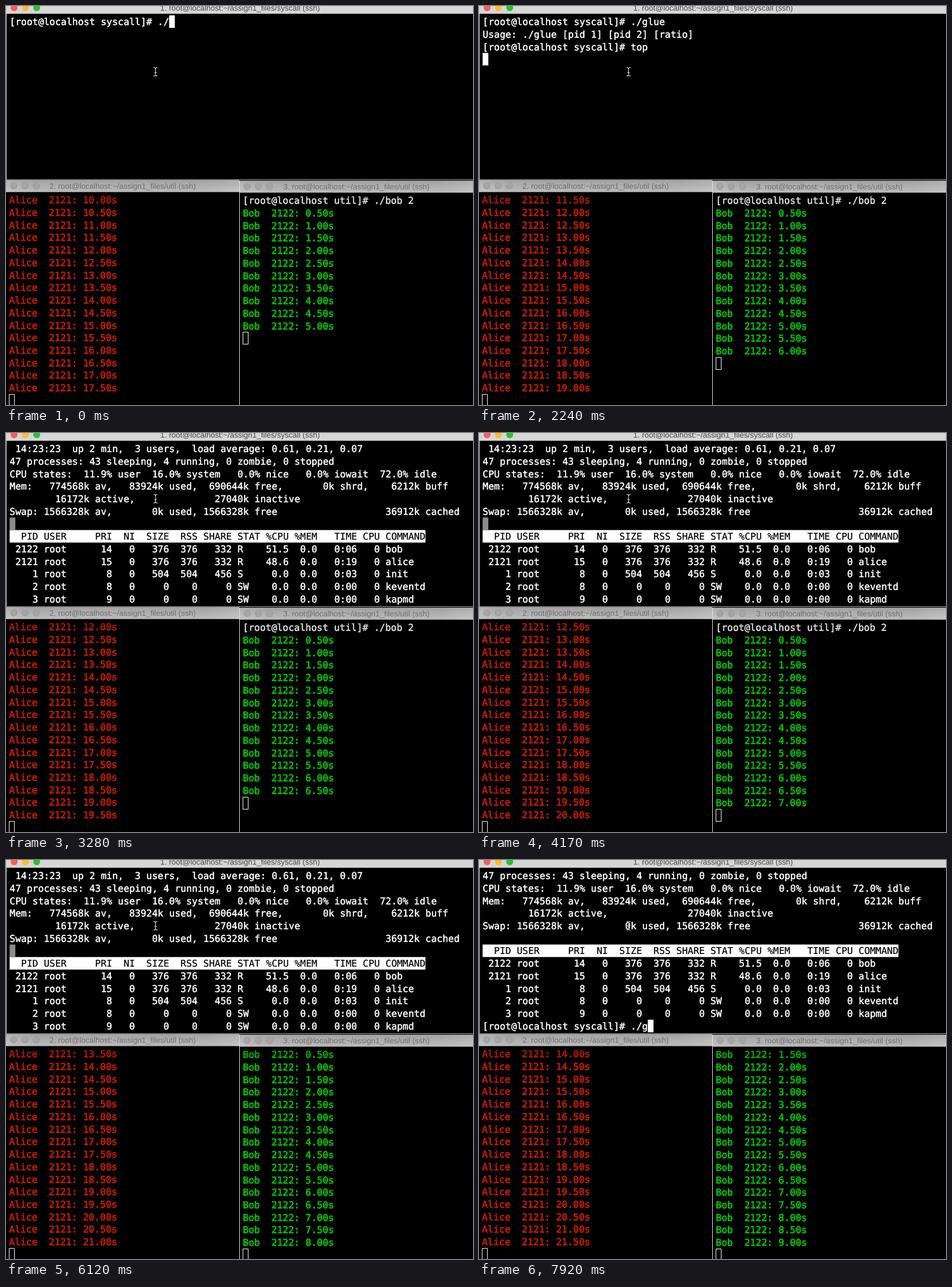
An HTML page with a canvas that plays this animation: 809 by 692 pixels, repeating every 8 s.

```html
<!DOCTYPE html>
<html lang="en">
<head>
<meta charset="utf-8">
<title>Three terminals</title>
<style>
html, body { margin: 0; width: 100%; height: 100%; overflow: hidden; background: #000; }
canvas { display: block; }
</style>
</head>
<body>
<canvas id="stage" width="809" height="692"></canvas>
<script>
const ctx = document.getElementById('stage').getContext('2d', { alpha: false });
const LOOP = 8000, CELL = 9.867, LINE = 21.73;
const RED = '#c91b00', GREEN = '#00c200', WHITE = '#fff';
const REGULAR = 0.5, BOLD = 0.8;
const PROMPT = '[root@localhost syscall]# ';

// Each pane: left edge and top of its first text row
const TOP = { x: 6.3, y: 16.2 }, LEFT = { x: 5.2, y: 325.3 }, RIGHT = { x: 410.3, y: 326.3 };

const aliceTicks = [140, 1190, 2240, 3130, 4170, 5220, 6120, 7170];
const bobTicks = [890, 1940, 2990, 3870, 4920, 5820, 6870, 7920];

const proc = (pid, pri, size, share, stat, cpu, time, cmd) =>
  String(pid).padStart(5) + ' root' + String(pri).padStart(8) + '   0' +
  String(size).padStart(6) + String(size).padStart(5) + String(share).padStart(6) +
  ' ' + stat.padEnd(4) + cpu.padStart(5) + '  0.0' + time.padStart(7) + '   0 ' + cmd;

const HEADER = '  PID USER     PRI  NI  SIZE  RSS SHARE STAT %CPU %MEM   TIME CPU COMMAND';
const report = [
  ' 14:23:23  up 2 min,  3 users,  load average: 0.61, 0.21, 0.07',
  '47 processes: 43 sleeping, 4 running, 0 zombie, 0 stopped',
  'CPU states:  11.9% user  16.0% system   0.0% nice   0.0% iowait  72.0% idle',
  'Mem:   774568k av,   83924k used,  690644k free,       0k shrd,    6212k buff',
  '        16172k active,              27040k inactive',
  'Swap: 1566328k av,       0k used, 1566328k free                   36912k cached',
  '',
  HEADER,
  proc(2122, 14, 376, 332, 'R', '51.5', '0:06', 'bob'),
  proc(2121, 15, 376, 332, 'R', '48.6', '0:19', 'alice'),
  proc(1, 8, 504, 456, 'S', '0.0', '0:03', 'init'),
  proc(2, 8, 0, 0, 'SW', '0.0', '0:00', 'keventd'),
  proc(3, 9, 0, 0, 'SW', '0.0', '0:00', 'kapmd')
];

const passed = (ticks, t) => ticks.filter(at => t >= at).length;

function rect(color, x, y, w, h) {
  ctx.fillStyle = color;
  ctx.fillRect(x, y, w, h);
}

function dot(color, x, y, r) {
  ctx.fillStyle = color;
  ctx.beginPath();
  ctx.arc(x, y, r, 0, 7);
  ctx.fill();
}

// Text on the character grid; weight thickens the strokes
function print(pane, row, text, color, weight = REGULAR) {
  ctx.font = '16.4px "DejaVu Sans Mono", monospace';
  ctx.textAlign = 'left';
  ctx.fillStyle = ctx.strokeStyle = color;
  ctx.lineWidth = weight;
  const y = pane.y + row * LINE + 16.9;
  [...text].forEach((ch, i) => {
    if (ch === ' ') return;
    const x = pane.x + i * CELL;
    ctx.fillText(ch, x, y);
    ctx.strokeText(ch, x, y);
  });
}

function block(row, col, color = WHITE, cells = 1) {
  rect(color, TOP.x + col * CELL, TOP.y + row * LINE, cells * CELL, LINE);
}

function hollow(pane, row) {
  ctx.strokeStyle = WHITE;
  ctx.lineWidth = 1;
  ctx.strokeRect(Math.floor(pane.x) + 0.5, Math.round(pane.y + row * LINE) + 0.5, 9, 21);
}

function title(text, x, y, color) {
  ctx.font = '13.5px "Liberation Sans", Arial, sans-serif';
  ctx.textAlign = 'center';
  ctx.fillStyle = color;
  ctx.fillText(text, x, y);
}

function inactiveBar(x, y, w, text, center) {
  const shade = ctx.createLinearGradient(0, y, 0, y + 21);
  shade.addColorStop(0, '#a2a2a2');
  shade.addColorStop(1, '#bcbcbc');
  rect(shade, x, y, w, 20.7);
  const ends = ctx.createLinearGradient(x, 0, x + w, 0);
  ends.addColorStop(0, 'rgba(255,255,255,.14)');
  ends.addColorStop(0.12, 'rgba(255,255,255,0)');
  ends.addColorStop(0.86, 'rgba(255,255,255,0)');
  ends.addColorStop(1, 'rgba(255,255,255,.14)');
  rect(ends, x, y, w, 20.7);
  for (let i = 0; i < 3; i++) {
    dot('#999', x + 13.5 + i * 19.5, y + 10, 6);
    dot('#a5a5a5', x + 13.5 + i * 19.5, y + 10, 5);
  }
  title(text, center, y + 15, '#707070');
}

function drawReport(from) {
  report.slice(from).forEach((text, row) => {
    if (text === HEADER) {
      block(row, 0, WHITE, HEADER.length);
      print(TOP, row, text, '#000', 0.2);
    } else print(TOP, row, text, WHITE);
  });
}

function command(row, typed) {
  print(TOP, row, PROMPT + typed, WHITE);
  block(row, PROMPT.length + typed.length);
}

function drawShell(t) {
  if (t >= 6720) {
    drawReport(1);
    command(12, './g'.slice(0, passed([7620, 7770, 7920], t)));
  } else if (t >= 3280) {
    drawReport(0);
    block(6, 0, '#8c8c8c');
  } else if (t >= 890) {
    print(TOP, 0, PROMPT + './glue', WHITE);
    print(TOP, 1, 'Usage: ./glue [pid 1] [pid 2] [ratio]', WHITE);
    if (t >= 2240) {
      print(TOP, 2, PROMPT + 'top', WHITE);
      block(3, 0);
    } else command(2, t < 1940 ? '' : t < 2090 ? 'to' : 'top');
  } else command(0, './glue'.slice(0, 2 + passed([140, 290, 440, 590], t)));
}

function drawAlice(t) {
  const start = 10 + passed(aliceTicks, t) / 2;
  for (let i = 0; i < 16; i++)
    print(LEFT, i, `Alice  2121: ${(start + i / 2).toFixed(2)}s`, RED, BOLD);
  hollow(LEFT, 16);
}

function drawBob(t) {
  const lines = ['[root@localhost util]# ./bob 2'];
  const count = 10 + passed(bobTicks, t);
  for (let i = 1; i <= count; i++) lines.push(`Bob  2122: ${(i / 2).toFixed(2)}s`);
  const shown = lines.slice(-16);
  shown.forEach((text, row) => {
    const style = text[0] === '[' ? [WHITE, REGULAR] : [GREEN, BOLD];
    print(RIGHT, row, text, ...style);
  });
  hollow(RIGHT, shown.length);
}

function drawPointer() {
  const beam = new Path2D('M255.5 106.5q3 0 3.5 2q.5-2 3.5-2M259 108v12M255.5 121.5q3 0 3.5-2q.5 2 3.5 2M257 115.5h4');
  for (const [color, width] of [['#000', 2], ['#ddd', 1.2]]) {
    ctx.strokeStyle = color;
    ctx.lineWidth = width;
    ctx.stroke(beam);
  }
}

function drawFrames() {
  rect('#d6d6d6', 0, 0, 809, 13.5);
  ['#fc5b57', '#fdbc2e', '#28c132'].forEach((color, i) => dot(color, 14 + i * 19.6, 3, 6));
  title('1. root@localhost:~/assign1_files/syscall (ssh)', 405.5, 8, '#484848');
  rect('#ddd', 0, 13, 1, 288);
  rect('#c8c8c8', 0, 300.6, 809, 1);

  // The front window casts a shadow on the rows below
  const shadow = ctx.createLinearGradient(0, 323, 0, 355);
  shadow.addColorStop(0, 'rgba(0,0,0,.2)');
  shadow.addColorStop(1, 'rgba(0,0,0,0)');
  rect(shadow, 0, 323, 809, 32);

  inactiveBar(0, 302, 404, '2. root@localhost:~/assign1_files/util (ssh)', 202);
  inactiveBar(404, 303, 405, '3. root@localhost:~/assign1_files/util (ssh)', 607);
  rect('#e4e4e4', 404, 303, 1, 389);
}

function draw(now) {
  const t = now % LOOP;
  rect('#000', 0, 0, 809, 692);
  drawShell(t);
  drawAlice(t);
  drawBob(t);
  drawFrames();
  drawPointer();
}

const begin = performance.now();
function tick() {
  draw(performance.now() - begin);
  requestAnimationFrame(tick);
}
ctx.lineJoin = 'round';
ctx.textRendering = 'geometricPrecision';
tick();
</script>
</body>
</html>
```
